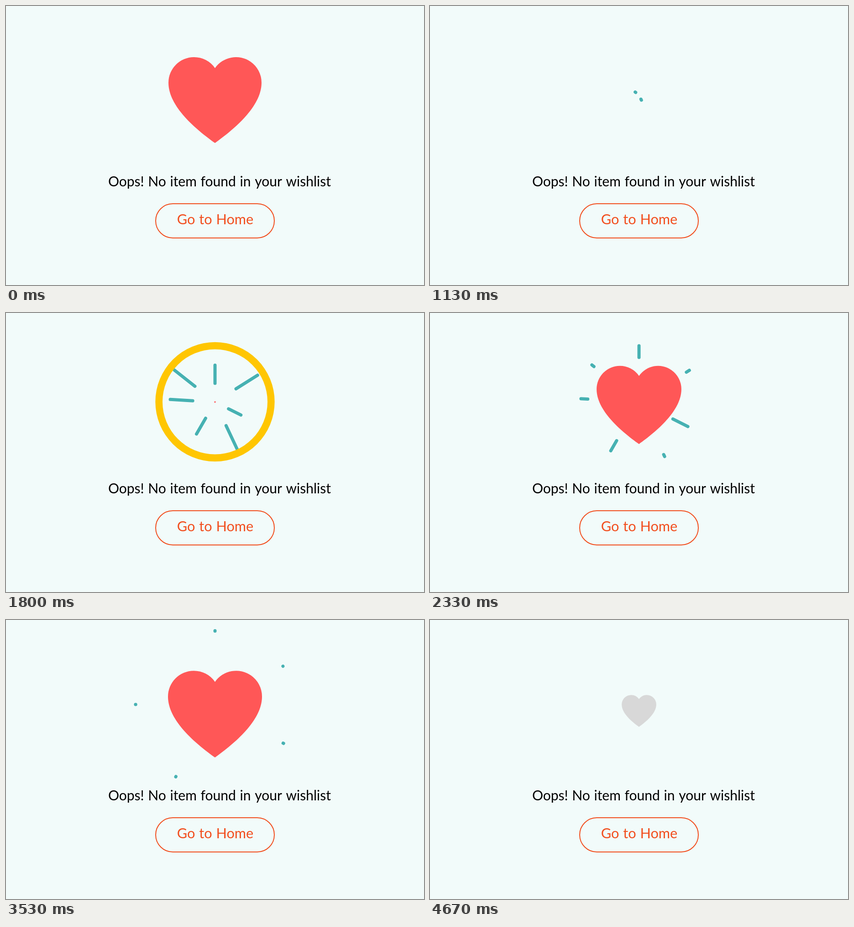
An HTML page with a canvas that plays this animation: 916x611 px, repeating every 4.74 s.

```html
<!DOCTYPE html>
<html lang="en">
<head>
<meta charset="utf-8">
<title>Empty wishlist</title>
<style>
  html, body { margin: 0; width: 100%; height: 100%; overflow: hidden; background: #f2fbfa; }
  canvas { display: block; }
</style>
</head>
<body>
<canvas id="stage" width="916" height="611"></canvas>
<script>
const ctx = document.getElementById('stage').getContext('2d');
const LOOP = 4740, CYCLE = 3800, STEP = 1000 / 15;
const CX = 458, CY = 195;
const RED = [255, 87, 87], GREY = [216, 216, 216];

// Each ray: angle in degrees, and how many beats it lags behind the first
const RAYS = [[218.2, 0.1], [64.8, 0], [-32.2, 0.3], [183.3, 1], [270, 2], [120.1, 2], [26.6, 3]];
const BEAT = 112;

const clamp = x => Math.min(1, Math.max(0, x));
const progress = (t, start, end) => clamp((t - start) / (end - start));
const lerp = (a, b, x) => a + (b - a) * x;
const easeOut = x => 1 - (1 - x) ** 2;
const softInOut = x => lerp(x, x * x * (3 - 2 * x), 0.5);

// The head shoots out, then drifts; the tail starts slowly and catches up.
function rayHead(x) {
  const burst = 0.289, reach = 0.637;
  return x < burst ? reach * x / burst : lerp(reach, 1, softInOut(progress(x, burst, 1)));
}

function rayTail(x) {
  const gap = 0.06 * x * (1 - x);
  return Math.min(Math.max(x, 1.87 * x - 0.25), rayHead(x) - gap);
}

function drawRay([angle, lag], t) {
  const x = progress(t - lag * BEAT, 1105, 3500);
  if (x <= 0 || x >= 1) return;
  const radius = part => lerp(8, 176, part);
  ctx.save();
  ctx.translate(CX, CY);
  ctx.rotate(angle * Math.PI / 180);
  ctx.strokeStyle = '#46b1b2';
  ctx.lineWidth = 7;
  ctx.lineCap = 'round';
  ctx.beginPath();
  ctx.moveTo(radius(rayTail(x)), 0);
  ctx.lineTo(radius(rayHead(x)), 0);
  ctx.stroke();
  ctx.restore();
}

function drawRing(t) {
  const x = progress(t, 1133, 2080);
  if (x <= 0.01 || x >= 1) return;
  const radius = 164.5 * softInOut(x);
  const width = 20.8 * (1 - x ** 4);
  ctx.fillStyle = '#ffc602';
  ctx.beginPath();
  ctx.arc(CX, 194.5, radius + width / 2, 0, Math.PI * 2);
  ctx.arc(CX, 194.5, Math.max(0, radius - width / 2), 0, Math.PI * 2, true);
  ctx.fill();
}

function drawHeart(t) {
  const growing = t > 1400;
  const scale = growing
    ? 1.01 * easeOut(progress(t, 1793, 2580))
    : 1 - progress(t, 310, 1012) ** 2;
  if (scale <= 0) return;
  const lift = growing ? 3.6 * Math.sin(Math.PI * progress(t, 1793, 2873)) : 0;
  const fade = growing ? 0 : progress(t, 0, 425);
  const color = RED.map((c, i) => Math.round(lerp(c, GREY[i], fade)));
  const notch = Math.atan2(-32, 46);
  ctx.save();
  ctx.translate(CX, CY - lift);
  ctx.scale(scale, scale);
  ctx.fillStyle = `rgb(${color})`;
  ctx.beginPath();
  ctx.moveTo(0, 105);
  ctx.bezierCurveTo(-42, 75, -102, 25, -102, -27);
  ctx.arc(-46, -27, 56, Math.PI, notch);
  ctx.arc(46, -27, 56, -Math.PI - notch, 0);
  ctx.bezierCurveTo(102, 25, 42, 75, 0, 105);
  ctx.fill();
  ctx.restore();
}

function drawText(text, x, y, size, color) {
  ctx.font = `${size}px Lato, sans-serif`;
  ctx.wordSpacing = '1px';
  ctx.textAlign = 'center';
  ctx.fillStyle = color;
  ctx.fillText(text, x, y);
}

function drawMessage() {
  drawText('Oops! No item found in your wishlist', 468, 395, 30, '#000');
  ctx.strokeStyle = '#f24e1e';
  ctx.lineWidth = 2;
  ctx.beginPath();
  ctx.roundRect(328, 433, 260, 75, 37.5);
  ctx.stroke();
  drawText('Go to Home', 458.5, 478, 30.7, '#f24e1e');
}

const start = performance.now();

function render() {
  const elapsed = (performance.now() - start) % LOOP;
  const t = Math.floor((elapsed + 4) / STEP) * STEP % CYCLE;
  ctx.fillStyle = '#f2fbfa';
  ctx.fillRect(0, 0, 916, 611);
  RAYS.forEach(ray => drawRay(ray, t));
  drawRing(t);
  drawHeart(t);
  drawMessage();
  requestAnimationFrame(render);
}
render();
</script>
</body>
</html>
```
